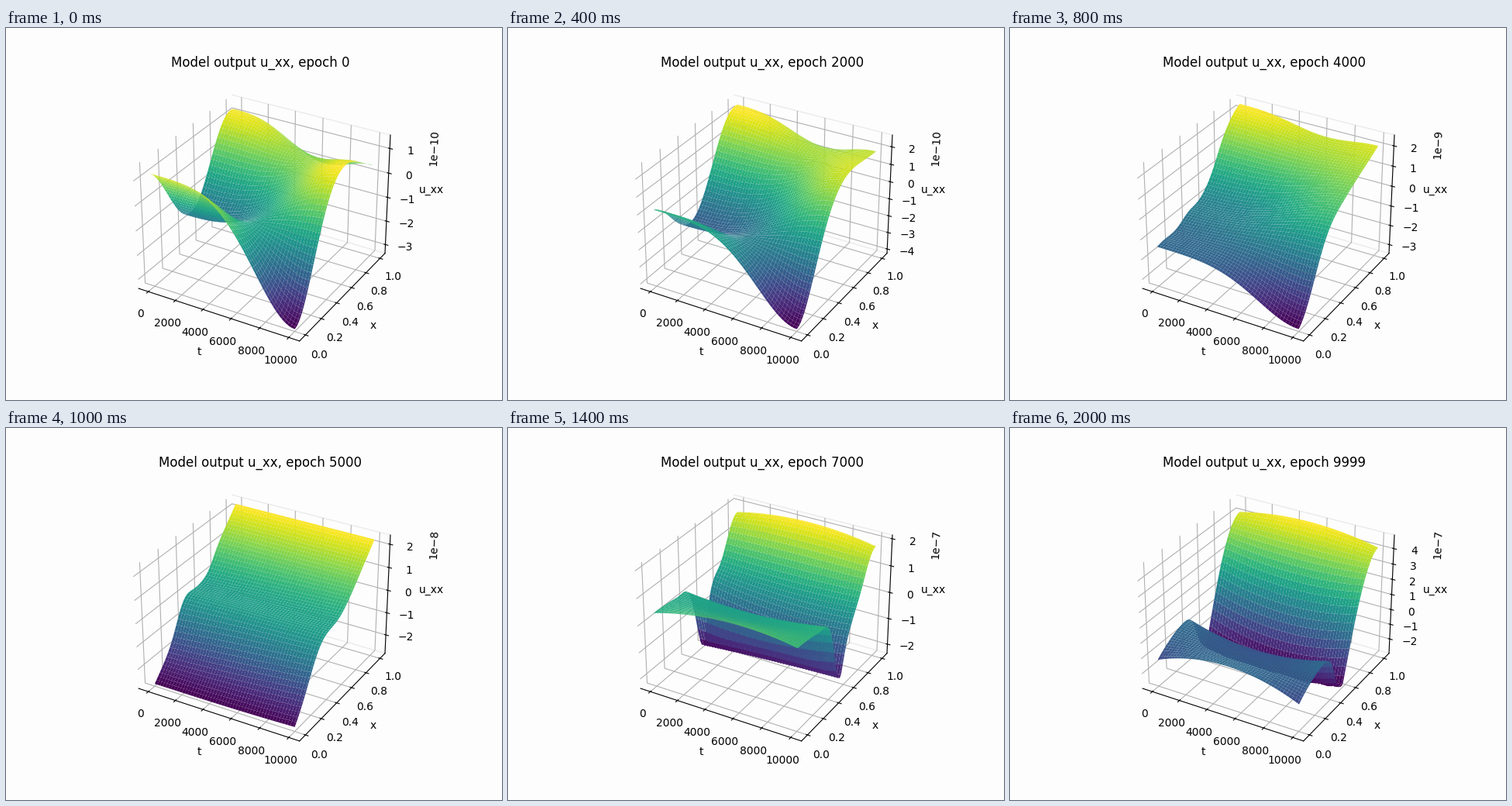
Recreate the animation shown at these times as a matplotlib script. Size 640x480 px, loop 2.1 s.

```python
import numpy as np
import matplotlib.pyplot as plt
from matplotlib.animation import FuncAnimation

FRAMES, STEP, LAST = 21, 500, 9999
PAPER = "#fdfdfd"

grid = np.linspace(0, 1, 100)
t, x = np.meshgrid(grid, grid, indexing="ij")


def bell(mid, width):
    return np.exp(-((x - mid) / width) ** 2)


def ease(u):
    return (1 - np.cos(np.pi * np.clip(u, 0, 1))) / 2


def unit(s):
    return (s - s.min()) / np.ptp(s)


def saddle(level, tilt, wave, top, bend, dip):
    """A wave in x at t=0 that eases into a single rise at t=1."""
    start = level + tilt * x - wave * np.cos(2 * np.pi * (x - .43))
    end = top * np.sin(np.pi / 2 * (2.15 * x - bend * x ** 2)) ** 2
    w = ease(t ** 1.6)
    warp = np.sin(np.pi * t ** 1.3) ** 2 * (.3 - 1.3 * x ** 3)
    return start + (end - start) * w + dip * warp


def slope():
    """A straight climb with a shoulder that softens along t."""
    shoulder = (.16 + .04 * t) * bell(.36 - .05 * t, .13 + .07 * t)
    return x + shoulder - .05 * (1 - t) * bell(.65, .1)


def trench():
    """A gentle fall cut by a narrow trench, rising again at the back."""
    fall = .85 + .12 * t - (.5 + .1 * t) * x
    cut = (.58 - .08 * t) * bell(.54, .075)
    lips = .05 * bell(.36, .06) + (.05 - .15 * t) * bell(.67, .08)
    back = .46 * ease((x - .75) / .25) + .2 * t * (1 - t) * x ** 2
    return fall - cut + lips + back


def valley(edge, rise, top):
    """A low front fold and a tall back wall, sagging halfway along t."""
    fold = (edge + rise * x * (1 - 1.25 * x)) / (1 + np.exp((x - .45) / .03))
    wall = top * np.sin(np.pi / 2 * np.clip((x - .56) / .44, 0, 1))
    sag = 4 * t * (1 - t) * (.135 - .95 * x + .885 * x ** 2)
    return np.maximum(fold + wall + sag, .02)


# step, lowest and highest u_xx, shape
keys = [
    (0, -3.28e-10, 1.44e-10, unit(saddle(.67, 0, .31, 1, .84, .19))),
    (2, -4.19e-10, 2.53e-10, unit(saddle(.391, .37, .264, .94, 1.05, .13))),
    (6, -4.06e-10, 2.53e-10, unit(saddle(.434, .33, .261, .93, 1.02, .135))),
    (10, -2.74e-8, 2.29e-8, unit(slope())),
    (12, -1.83e-7, 1.055e-7, unit(trench())),
    (16, -2.82e-7, 3.97e-7, unit(valley(.31, .5, .92))),
    (20, -2.83e-7, 4.71e-7, unit(valley(.235, .75, .955))),
]


def output(i):
    """Blend shapes linearly and magnitudes geometrically."""
    j = max(n for n in range(len(keys) - 1) if keys[n][0] <= i)
    (s0, lo0, hi0, a), (s1, lo1, hi1, b) = keys[j], keys[j + 1]
    u = (i - s0) / (s1 - s0)
    lo = lo0 * (lo1 / lo0) ** u
    hi = hi0 * (hi1 / hi0) ** u
    return lo + (hi - lo) * unit(a + (b - a) * u)


fig = plt.figure(figsize=(6.4, 4.8), dpi=100, facecolor=PAPER)
ax = fig.add_subplot(projection="3d")


def draw(i):
    ax.clear()
    ax.set_facecolor(PAPER)
    ax.xaxis.pane.set_visible(False)
    ax.zaxis.pane.set_visible(False)
    ax.yaxis.set_pane_color((.92, .92, .92, 1))
    ax.yaxis.pane.set_fill(False)
    ax.plot_surface(t * 10000, x, output(i), cmap="viridis")
    ax.set_xlabel("t")
    ax.set_ylabel("x")
    ax.set_zlabel("u_xx")
    ax.set_title(f"Model output u_xx, epoch {min(i * STEP, LAST)}")
    return []


anim = FuncAnimation(fig, draw, frames=FRAMES, init_func=lambda: [],
                     interval=100, repeat=True, repeat_delay=0)
plt.show()
```
